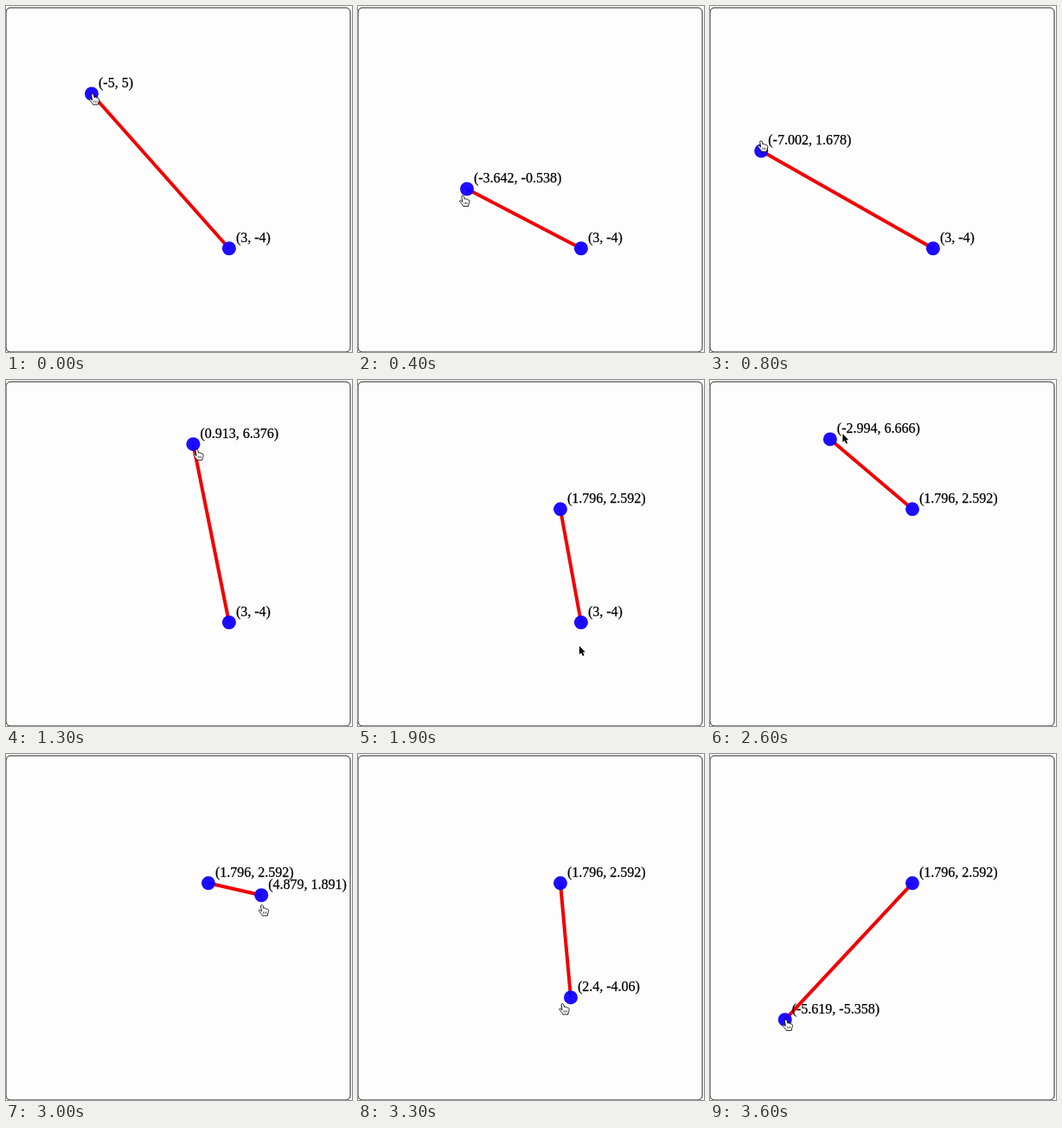
Animation, 400 px wide and 400 px high, one loop 3.7 s. Source, as an HTML page with a canvas:

```html
<!DOCTYPE html>
<html lang="en">
<head>
<meta charset="utf-8">
<title>Draggable segment</title>
<style>
html, body { margin: 0; width: 100%; height: 100%; overflow: hidden; background: #fff; }
canvas { display: block; }
</style>
</head>
<body>
<canvas id="stage" width="400" height="400"></canvas>
<script>
const ctx = document.getElementById('stage').getContext('2d');
const STEP = 100, STEPS = 37;
const UNIT = 19.86, LEAD = 0.3, HOVER = 14;

// Key points: [step, x, y] in graph units, joined by smooth curves.
const first = [
  [0, -5, 5], [3, -3.04, 0.73], [6, -5.81, -2], [8, -7.002, 1.678],
  [10, -6.6, 5.81], [12, -0.72, 7.67], [13, 0.913, 6.376], [17, 1.796, 2.592]
];
const roam = [[17, 1.796, 2.592], [18, 2.7, -5.55], [19, 2.9, -5.37], [21, 3, -4]];
const second = [
  [21, 3, -4], [24, -2.08, -2.8], [25, -4.6, 2.2], [26, -2.994, 6.666],
  [28, 2.7, 5.4], [30, 4.879, 1.891], [33, 2.4, -4.06], [36, -5.619, -5.358]
];

const hand = new Path2D('M-1.5 1.5C-1.5-.4 1-.4 1.4 1.2L2.3 4.5C3 3.6 4.4 3.8 4.7 4.9' +
  'C5.6 4.3 6.6 4.7 6.8 5.7C8 5.4 8.5 6.2 8.4 7.5C8.3 9.5 7.2 10.5 7 13.5H.5' +
  'C0 11.5-2.5 9.5-3.8 7.4C-4.4 6.2-2.8 5.7-1.7 7L-.4 8Z');
const knuckles = new Path2D('M1.8 8.5V11M3.6 8.5V11M5.4 8.5V11');
const arrow = new Path2D('M0 0V11.5L2.6 9.2L4.6 13.6L6.6 12.7L4.7 8.4H8Z');

const toPixel = ([x, y]) => [198.3 + UNIT * x, 200.8 - UNIT * y];
const firstStep = keys => keys[0][0];
const lastStep = keys => keys[keys.length - 1][0];

// Slope through the neighbours of a key; the ends are at rest.
function slope(keys, i, axis) {
  const before = keys[i - 1], after = keys[i + 1];
  return before && after ? (after[axis] - before[axis]) / (after[0] - before[0]) : 0;
}

function along(keys, step) {
  const t = Math.max(firstStep(keys), Math.min(lastStep(keys), step));
  const i = Math.max(1, keys.findIndex(key => key[0] >= t));
  const from = keys[i - 1], to = keys[i];
  const span = to[0] - from[0];
  const u = (t - from[0]) / span, v = 1 - u;
  return [1, 2].map(axis =>
    v * v * (1 + 2 * u) * from[axis] + u * u * (1 + 2 * v) * to[axis] +
    u * v * span * (v * slope(keys, i - 1, axis) - u * slope(keys, i, axis)));
}

// While dragging, the pointer runs ahead of its point in proportion to speed.
function cursorAt(step) {
  if (step > lastStep(roam) || step < firstStep(roam)) {
    const keys = step < firstStep(roam) ? first : second;
    const dt = 0.01;
    const [x, y] = along(keys, step);
    const [nx, ny] = along(keys, step + dt);
    return toPixel([x + (nx - x) / dt * LEAD, y + (ny - y) / dt * LEAD]);
  }
  return toPixel(along(roam, step));
}

function drawDot([x, y]) {
  ctx.fillStyle = 'rgba(16, 0, 255, 0.95)';
  ctx.beginPath();
  ctx.arc(x, y, 8, 0, 2 * Math.PI);
  ctx.fill();
}

function drawLabel(point) {
  const [x, y] = toPixel(point);
  const label = `(${point.map(v => +v.toFixed(3)).join(', ')})`;
  ctx.fillStyle = ctx.strokeStyle = '#000';
  ctx.lineWidth = 0.25;
  ctx.fillText(label, x + 8, y - 7.5);
  ctx.strokeText(label, x + 8, y - 7.5);
}

function drawCursor([x, y], overPoint) {
  ctx.save();
  ctx.translate(x, y);
  ctx.lineJoin = 'round';
  if (overPoint) {
    ctx.translate(1, 0);
    ctx.scale(0.92, 0.92);
    ctx.fillStyle = '#fff';
    ctx.strokeStyle = '#111';
    ctx.lineWidth = 1;
    ctx.fill(hand);
    ctx.stroke(hand);
    ctx.lineWidth = 0.7;
    ctx.stroke(knuckles);
  } else {
    ctx.scale(0.85, 0.85);
    ctx.strokeStyle = '#fff';
    ctx.lineWidth = 2;
    ctx.stroke(arrow);
    ctx.fillStyle = '#000';
    ctx.fill(arrow);
  }
  ctx.restore();
}

function draw(step) {
  const points = [along(first, step), along(second, step)];
  const [a, b] = points.map(toPixel);

  ctx.clearRect(0, 0, 400, 400);
  ctx.beginPath();
  ctx.roundRect(0, 2, 398, 398, 5);
  ctx.fillStyle = '#fdfdfd';
  ctx.fill();
  ctx.strokeStyle = '#222';
  ctx.lineWidth = 1;
  ctx.stroke();

  ctx.beginPath();
  ctx.moveTo(...a);
  ctx.lineTo(...b);
  ctx.strokeStyle = '#f00000';
  ctx.lineWidth = 4;
  ctx.stroke();

  [a, b].forEach(drawDot);
  ctx.font = '16px "Liberation Serif", Times, serif';
  points.forEach(drawLabel);

  const cursor = cursorAt(step);
  const near = ([x, y]) => Math.hypot(cursor[0] - x, cursor[1] - y) < HOVER;
  drawCursor(cursor, near(a) || near(b));
}

function tick() {
  draw(Math.floor(performance.now() / STEP) % STEPS);
  requestAnimationFrame(tick);
}
tick();
</script>
</body>
</html>
```
